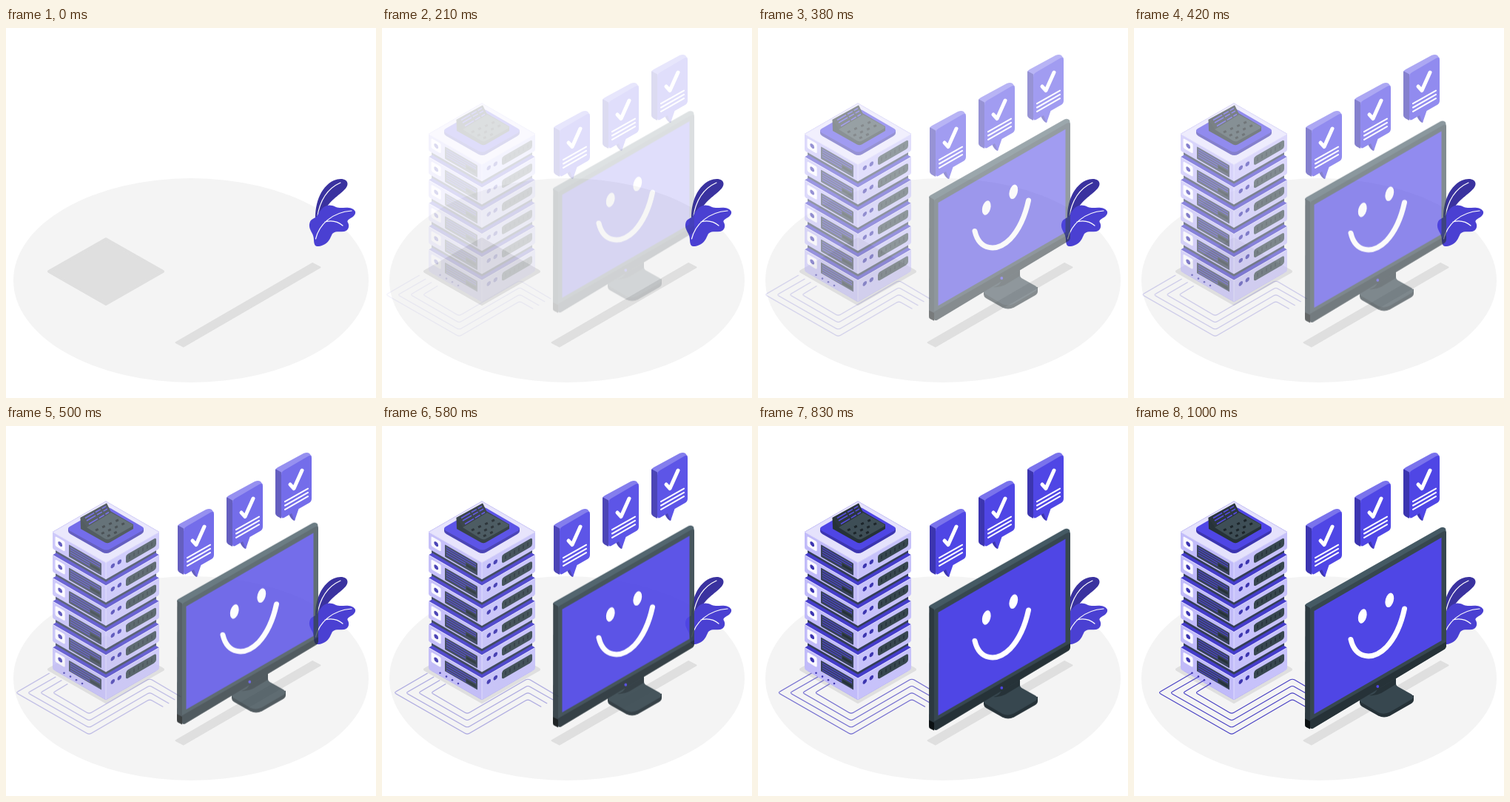
These frames come from a looping animation (500 by 500 pixels, 1040 ms). An HTML page:

```html
<!DOCTYPE html>
<html lang="en">
<head>
<meta charset="utf-8">
<title>Server and monitor</title>
<style>
  html, body { margin: 0; width: 100%; height: 100%; overflow: hidden; background: #fff; }
  svg { display: block; width: 100%; height: 100%; }

  /* Motion ends at about 955 ms, then holds until the loop restarts. */
  .fade, .drop, .slide { animation: 1040ms infinite; }
  .fade { animation-name: fade; }
  .drop { animation-name: drop; }
  .slide { animation-name: slide; }
  @keyframes fade {
    0% { opacity: 0; animation-timing-function: cubic-bezier(.36, -.01, .5, 1.38); }
    91.8%, 100% { opacity: 1; }
  }
  @keyframes drop {
    0% { opacity: 0; transform: translateY(-30px); animation-timing-function: cubic-bezier(.36, -.01, .5, 1.38); }
    91.8%, 100% { opacity: 1; transform: none; }
  }
  @keyframes slide {
    0% { opacity: 0; transform: translateX(-30px); animation-timing-function: ease-in; }
    91.8%, 100% { opacity: 1; transform: none; }
  }

  .shade { fill: #dfdfdf; stroke: #dfdfdf; stroke-width: 4; stroke-linejoin: round; }
  .line { fill: none; stroke: #fff; stroke-linecap: round; stroke-linejoin: round; }
  .edge { stroke: #dedafc; stroke-width: 1; }
  .blue { fill: #4f46e5; }
  .navy { fill: #3c35b0; }
  .slate { fill: #37474f; }
  .dark { fill: #263238; }
  .left { fill: #c1bbf9; }
  .right { fill: #c7c2fa; }
</style>
</head>
<body>
<svg viewBox="0 0 500 500">
  <defs>
    <g id="unit">
      <path fill="#453dcb" d="M67 163L135 203L203 163V174.3L135 213.6L67 174.3Z"/>
      <path fill="#333d55" d="M67 163L135 203L203 163V171L135 210.5L67 171Z"/>
      <path fill="#453dcb" d="M135 101.5L207 143L135 185L63 143Z"/>
      <path class="left" d="M63 143L135 184.6V207.3L64.5 166.7Q63 165.8 63 164Z"/>
      <path class="right" d="M207 143L135 184.6V207.3L205.5 166.7Q207 165.8 207 164Z"/>
      <path class="line edge" d="M63.5 143.3L135 184.6L206.5 143.3M135 185V206.5"/>
      <g transform="matrix(1 .577 0 1 63 143)">
        <rect x="3.5" y="3.8" width="13.2" height="13.4" rx="2" fill="#faf9ff"/>
        <circle class="navy" cx="10.2" cy="10.6" r="2.9"/>
        <rect x="22" y="4.5" width="44" height="16.5" rx="1" fill="#374257"/>
        <path stroke="#4a42c4" stroke-width="1.5" d="M24 7.3h40M24 10.5h40M24 13.7h26M24 16.9h26"/>
        <rect class="dark" x="51" y="13.5" width="13" height="3.5"/>
      </g>
      <g transform="matrix(1 -.577 0 1 135 185)">
        <circle class="navy" cx="9.3" cy="9.2" r="2.8"/>
        <circle class="navy" cx="18.3" cy="9.2" r="2.8"/>
        <rect class="slate" x="27" y="5" width="41" height="11.5" rx="3"/>
        <path stroke="#2a363f" stroke-width="5" stroke-dasharray="2 4" d="M31 10.7h34"/>
      </g>
    </g>

    <g id="bubble">
      <path class="navy" d="M249 190L251 197Q255 204 258 204L261 191Z"/>
      <path fill="#7a73ec" d="M232 136Q232 133.5 235 132L270 113Q275 111 278 113L281 117L240 141Z"/>
      <path class="navy" d="M232.5 134.2L240 138.5V201L234.5 198Q232 196.5 232 194V136Q232 135 232.5 134.2Z"/>
      <path class="blue" d="M240 142Q240 138 243.5 136L276 117Q281 114.5 281 119V174Q281 178 277.5 180L263.5 188L258 204L254 194L244.5 199.5Q240 202 240 198Z"/>
      <path class="line" stroke-width="5" d="M252 155L257 160.5L268 136"/>
      <path class="line" stroke-width="2.1" d="M245 178.2L276 160.6M245 183.5L276 165.9M245 188.8L276 171.2"/>
    </g>
  </defs>

  <ellipse cx="250" cy="341" rx="240" ry="138" fill="#f4f4f4"/>
  <path class="shade" d="M58 329L135 285.3L212 329L135 373Z"/>
  <path class="shade" style="stroke-width:2" d="M229.5 425L414 318L424.5 323.5L240 430.5Z"/>

  <g id="plant">
    <path fill="#3a329f" d="M418.5 265C416 240 424 215 443 206C452 202 462 204 461.5 211C461 219 447 226 438 236C430 245 427 253 424 264Z"/>
    <path class="line" stroke-width="1.2" d="M420.5 256C424 233 434 217 452 209"/>
    <path fill="#4a40d2" d="M418 294C415 290 417 285 414.5 279C412 274 408.5 269 410.5 263C412 258 416 258 419.5 255C424 249 427 240 437 239.5C443 239.5 446 243 451 243C459 243 468 241 472 248C473.5 256 461 257 461.5 262C465 267 463 274 457 275C450 276 445 274 441 278C438 284 436 291 428 293.5C424 295 420 296 418 294Z"/>
    <path class="line" stroke-width="1.2" d="M418.5 285C423 266 440 249 467 247M431 262C440 259.5 448 261 455 267"/>
  </g>

  <g class="fade">
    <use href="#unit" y="156.5"/>
    <use href="#unit" y="125.2"/>
    <use href="#unit" y="93.9"/>
    <use href="#unit" y="62.6"/>
    <use href="#unit" y="31.3"/>
    <use href="#unit"/>
    <path class="left" d="M63 318.5L135 360.1V370.3L65 330Q63 328.8 63 326.5Z"/>
    <path class="right" d="M207 318.5L135 360.1V370.3L205 330Q207 328.8 207 326.5Z"/>
    <path class="line edge" d="M135 360V369"/>
    <g class="navy">
      <circle cx="78.5" cy="333.7" r="1.3"/>
      <circle cx="87" cy="338.6" r="1.3"/>
      <circle cx="95" cy="343.3" r="1.3"/>
      <circle cx="103" cy="348" r="1.3"/>
    </g>

    <path fill="#e5e2fc" d="M135 101.5L207 143L135 184.6L63 143Z"/>
    <path class="line edge" style="stroke:#d2cdfa" d="M64 143L135 102L206 143"/>
    <path class="navy" d="M84 138.5V142Q84 144 87 146L130 170.5Q135.5 173.5 141 170.5L183 146Q186 144 186 142V138.5Z"/>
    <path class="blue" d="M86 136L129.5 111Q135.5 108 141 111L184 136Q188 138.7 184 141.5L141 166Q135.5 169 130 166L86 141.5Q82 138.7 86 136Z"/>

    <path class="dark" d="M100.5 124L101 139L134 157.5Q137 159 140 157.5L172 139V133L141 115L136 104.5Z"/>
    <path fill="#3e4e56" d="M109 137L142 117L170 132.5Q173 134.2 170 136L140 152.7Q137 154 134 152.5Z"/>
    <path fill="#2b363d" d="M100.5 124L136 104.5L142 116.5L109 136.5Z"/>
    <path stroke="#554cdf" stroke-width="1.6" stroke-dasharray="14 2 8 2" d="M107 124.5L135 108.5M109 128L137 112M112 132.5L139 116.5"/>
    <path stroke="#1c252a" stroke-width="3" stroke-dasharray="4 6" d="M121 141L153 126.5M129 145.5L160 131.5M137 149L150 143"/>
  </g>

  <g class="slide" fill="none" stroke="#4840c4" stroke-width="1.1" stroke-linejoin="round">
    <path d="M78.5 334L36 358.7Q33 360.3 36 362L129 415.2Q132 417 135 415.2L211 371Q214 369.3 217 371L232 379.5"/>
    <path d="M87 339L52 359Q49 360.5 52 362.2L129 405.9Q132 407.6 135 405.9L211 361.7Q214 360 217 361.7L240 375"/>
    <path d="M95 343.5L69 358.7Q66 360.4 69 362L129 396.6Q132 398.3 135 396.6L211 352.4Q214 350.7 217 352.4L248 370"/>
    <path d="M103 348.5L86 358.7Q83 360.4 86 362L129 387.3Q132 389 135 387.3L211 343.1Q214 341.4 217 343.1L256 366"/>
  </g>

  <g class="fade">
    <use href="#bubble"/>
    <use href="#bubble" x="66" y="-38"/>
    <use href="#bubble" x="132" y="-76"/>
  </g>

  <g class="drop">
    <path class="dark" d="M305 368V374Q305 377 308 379L330 391.5Q338 395.5 346 391.5L374 375.5Q378 373 378 370V364Z"/>
    <path class="slate" d="M307 366L333 351L354 340V348Q354 351 358 353L375 362.5Q380 366 375 369.5L346 386.5Q338 390.5 330 387L308 374Q302 370 307 366Z"/>
    <path class="dark" d="M329 354L354 340V349L334 361Q326 365 318 364Q328 362 329 354Z"/>

    <path fill="#455a64" d="M231 243Q231 241 233 240L414 137.5Q418 135.5 421 138.5L422 144L238 250Z"/>
    <path fill="#2c3940" d="M231.3 242L238 246V409.5L233 407Q231 406 231 403Z"/>
    <path class="slate" d="M238 249Q238 246.5 240 245.3L417 143Q422 140 422 145V296Q422 300 419 302L242 408.5Q238 410.5 238 406Z"/>
    <path class="dark" d="M238 397.5L422 291.5V296Q422 300 419 302L242 408.5Q238 410.5 238 406Z"/>
    <path fill="#0c1113" d="M231 395.5L238 399V409.5L233 407Q231 406 231 403Z"/>
    <path class="blue" d="M243.5 250L415.5 150.8V290L243.5 389.3Z"/>
    <circle class="blue" cx="329.3" cy="352" r="1.9"/>
    <g fill="#fff">
      <ellipse cx="308.7" cy="257" rx="5.5" ry="10" transform="rotate(15 308.7 257)"/>
      <ellipse cx="345.3" cy="235.3" rx="5.5" ry="10" transform="rotate(15 345.3 235.3)"/>
    </g>
    <path class="line" stroke-width="7" d="M293 288.5C299 314 322 318 341 299C353 286 361 268 365.5 247"/>
  </g>
</svg>
</body>
</html>
```
